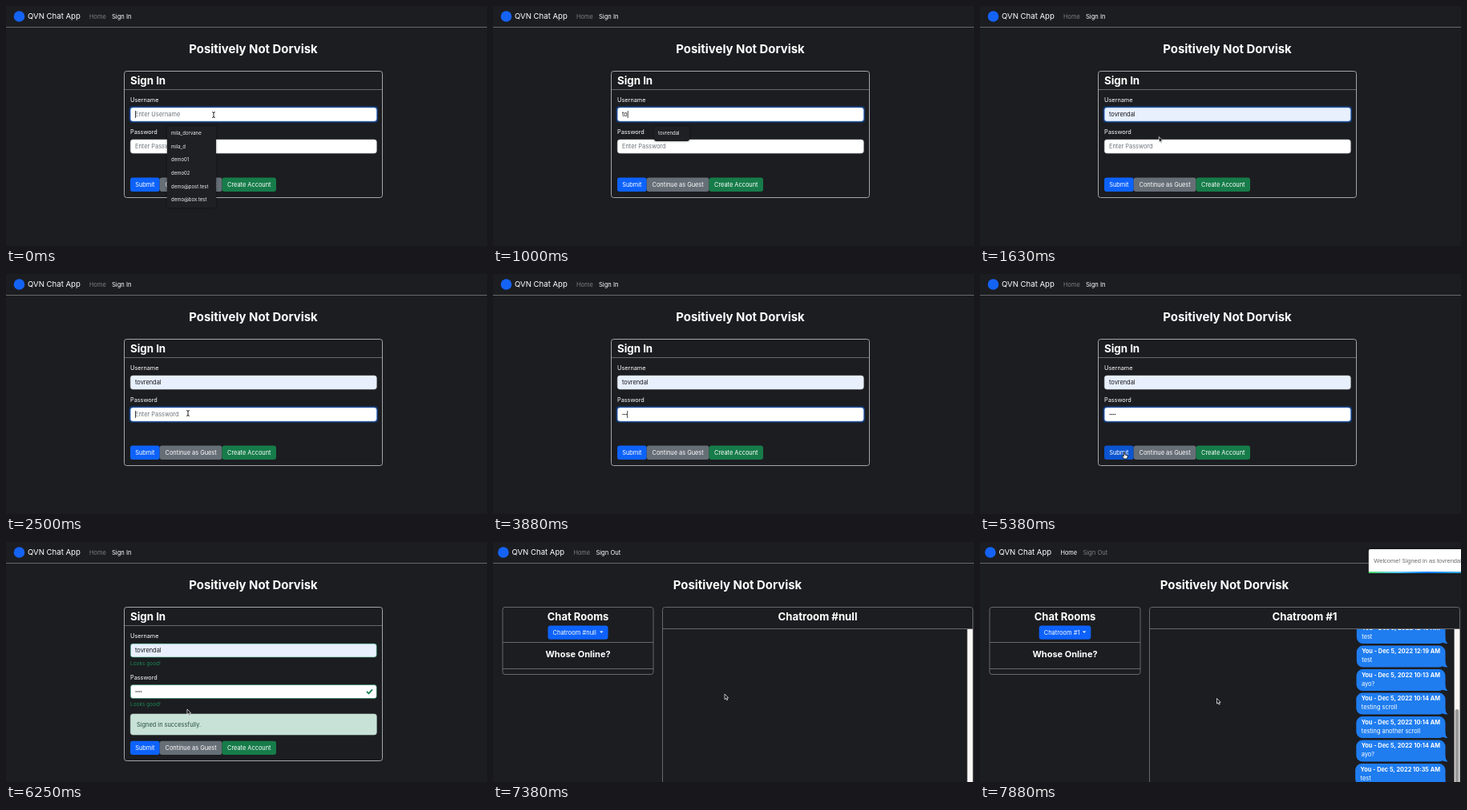
An HTML page with a canvas for the animation above (8000 ms loop, 600 by 300 pixels).

```html
<!DOCTYPE html>
<html lang="en">
<head>
<meta charset="utf-8">
<title>Chat sign in</title>
<style>
html, body { margin: 0; width: 100%; height: 100%; overflow: hidden; background: #1c1d21; }
canvas { display: block; width: 600px; height: 300px; }
</style>
</head>
<body>
<canvas id="stage" width="600" height="300"></canvas>
<script>
const ctx = document.getElementById('stage').getContext('2d');
const LOOP = 8000, STEP = 125;
const BG = '#1c1d21', WHITE = '#fff', LINE = '#67686b', BLUE = '#0d62fb', GREEN = '#167c49', GRAY = '#666e76';
const USER = 'tovrendal', APP = 'QVN Chat App', HEADLINE = 'Positively Not Dorvisk';
const SUGGESTIONS = ['mila_dorvane', 'mila_d', 'demo01', 'demo02', 'demo@post.test', 'demo@box.test'];
const MESSAGES = [
  ['12:19', 'test'], ['12:19', 'test'], ['10:13', 'ayo?'], ['10:14', 'testing scroll'],
  ['10:14', 'testing another scroll'], ['10:14', 'ayo?'], ['10:35', 'test']
];

// time, x, y of the pointer hot spot
const PATH = [
  [0, 259, 136], [1125, 259, 136], [1500, 222, 160], [2000, 227, 174], [4375, 227, 174],
  [4625, 212, 224], [4750, 189, 222], [5000, 180, 223], [5375, 180, 223], [6000, 226, 209],
  [6875, 226, 209], [7375, 289, 190], [7875, 295.5, 195.5]
];

const between = (t, a, b) => t >= a && t < b;

function text(str, x, y, size, color = WHITE, weight = 400, align = 'left', family = 'Inter') {
  ctx.font = `${weight} ${size}px ${family}, sans-serif`;
  ctx.fillStyle = color;
  ctx.textAlign = align;
  ctx.fillText(str, x, y);
}

function box(x, y, w, h, r, fill, stroke, lineWidth = 1) {
  ctx.beginPath();
  ctx.roundRect(x, y, w, h, r);
  if (fill) { ctx.fillStyle = fill; ctx.fill(); }
  if (stroke) { ctx.strokeStyle = stroke; ctx.lineWidth = lineWidth; ctx.stroke(); }
}

function rule(x1, x2, y) {
  ctx.fillStyle = LINE;
  ctx.fillRect(x1, y, x2 - x1, 1);
}

function polygon(points, x, y) {
  ctx.beginPath();
  points.forEach(([px, py]) => ctx.lineTo(x + px, y + py));
  ctx.closePath();
}

function header(shift, center, link, homeActive) {
  const dim = '#7d7e81';
  ctx.fillStyle = '#1463f5';
  ctx.beginPath();
  ctx.arc(16.5 - shift, 13, 6.8, 0, Math.PI * 2);
  ctx.fill();
  text(APP, 27 - shift, 16.3, 9.6);
  text('Home', 104 - shift, 15.6, 7.4, homeActive ? WHITE : dim);
  text(link, 132 - shift, 15.6, 7.6, homeActive ? dim : WHITE);
  rule(0, 600, 26);
  text(HEADLINE, center, 58.7, 14.9, WHITE, 700, 'center');
}

function field(y, { value = '', hint = '', fill = WHITE, focus = false, valid = false }) {
  if (focus) box(153.5, y - 1.5, 310.5, 20.5, 4, '#14386f');
  box(155.3, y + 0.3, 307, 17, 3, fill, focus ? '#6ea5f8' : valid ? '#198754' : '#ced4da', 0.6);
  if (value) text(value, 161, y + 11.3, 7.4, '#16181b');
  else if (hint) text(hint, 161, y + 11.3, 7.4, '#6c757d');
}

function caret(x, y) {
  ctx.fillStyle = '#222';
  ctx.fillRect(x, y, 0.8, 9);
}

function button(label, x, y, w, color) {
  box(x, y, w, 17.3, 3, color);
  text(label, x + w / 2, y + 11.3, 7.4, WHITE, 400, 'center');
}

function suggestions(t) {
  const all = t < 500;
  const items = all ? SUGGESTIONS : [USER];
  ctx.shadowColor = 'rgba(0,0,0,.5)';
  ctx.shadowBlur = 3;
  box(201, 150, all ? 61 : 44, all ? 102 : 19, 3, '#1f2023');
  ctx.shadowBlur = 0;
  if (between(t, 1375, 1625)) box(201, 153, 44, 14, 0, '#3a3b3f');
  items.forEach((item, i) => text(item, 206, 161.2 + i * 16.6, 6, '#f0f0f0'));
}

function signIn(t) {
  const done = t >= 5500, filled = t >= 1375;
  const typed = filled ? USER : USER.slice(0, t < 500 ? 0 : t < 750 ? 1 : 2);
  const dots = [3375, 3625, 3875, 4000].filter(at => t >= at).length;
  const passY = done ? 178.3 : 166.8, buttonY = done ? 248.8 : 214.6;

  header(0, 308.5, 'Sign In', false);
  box(147.5, 81.5, 322, done ? 192 : 158, 3, null, '#a5a6a8');
  rule(148, 469, 104);
  text('Sign In', 155, 97.7, 13.3, WHITE, 700);

  text('Username', 155, 120.2, 7.3);
  field(126.8, {
    value: typed, hint: 'Enter Username', fill: filled ? '#e8f0fe' : WHITE,
    focus: t < 2250, valid: done
  });
  if (t < 250 || between(t, 500, 1375)) {
    ctx.font = '400 7.4px Inter, sans-serif';
    caret(161 + ctx.measureText(typed).width, 131);
  }

  text('Password', 155, passY - 6.8, 7.3);
  field(passY, {
    hint: dots ? '' : 'Enter Password', focus: between(t, 2250, 5500), valid: done
  });
  ctx.fillStyle = '#222';
  for (let i = 0; i < dots; i++) {
    ctx.beginPath();
    ctx.arc(162.2 + i * 2.1, passY + 8.7, 0.75, 0, Math.PI * 2);
    ctx.fill();
  }
  if (between(t, 2250, 2750) || between(t, 3375, 4375)) caret(161 + dots * 2.1, passY + 4.2);

  if (done) {
    text('Looks good!', 155, 153.6, 6.5, '#198754');
    text('Looks good!', 155, 204.9, 6.5, '#198754');
    ctx.strokeStyle = '#198754';
    ctx.lineWidth = 1.9;
    ctx.beginPath();
    ctx.moveTo(450, 187);
    ctx.lineTo(452.5, 189.4);
    ctx.lineTo(457, 184.3);
    ctx.stroke();
    box(155.3, 215, 307, 26, 3, '#c9e2d7', '#badbcc', 0.6);
    text('Signed in successfully.', 163, 230.6, 7.4, '#25503d');
  }

  button('Submit', 155, buttonY, 36.7, between(t, 4875, 5500) ? '#0b55d0' : BLUE);
  button('Continue as Guest', 191.7, buttonY, 77.8, between(t, 4625, 4875) ? '#555c63' : GRAY);
  button('Create Account', 269.5, buttonY, 67.5, GREEN);
  if (t < 1625) suggestions(t);
}

function bubble([time, body], baseline) {
  const title = `You - Dec 5, 2022 ${time} AM`;
  ctx.font = '700 7.35px Inter, sans-serif';
  const left = 574 - ctx.measureText(title).width;
  const right = 580.5, top = baseline - 9.8, bottom = top + 27;
  box(left - 6.5, top, right - left + 6.5, 27, 8, '#1f7df0');
  ctx.beginPath();
  ctx.moveTo(right, bottom - 8);
  ctx.quadraticCurveTo(right, bottom - 2, right + 3, bottom - 0.3);
  ctx.quadraticCurveTo(right - 2.5, bottom + 0.3, right - 6.5, bottom - 3);
  ctx.fill();
  text(title, left, baseline, 7.35, WHITE, 700);
  text(body, left, baseline + 11, 7.4);
}

function toast(t) {
  const p = Math.min((t - 7612) / 420, 1);
  const x = 409 + 0.57 * (3025 * (1 - p) ** 3 - 25);
  if (x > 600) return;
  ctx.shadowColor = 'rgba(0,0,0,.3)';
  ctx.shadowBlur = 4;
  box(x, 9, 182, 30, 2, WHITE);
  ctx.shadowBlur = 0;
  text(`Welcome! Signed in as ${USER}`, x + 6.5, 26.4, 7.5, '#6a6a6a', 400, 'left', '"Liberation Sans"');
  const bar = ctx.createLinearGradient(x, 0, x + 182, 0);
  ['#4cd964', '#5ac8fa', '#007aff', '#34aadc', '#5856d6', '#ff2d55']
    .forEach((color, i) => bar.addColorStop(i / 5, color));
  ctx.fillStyle = bar;
  ctx.fillRect(x, 37, 182, 2);
}

function chat(t) {
  const joined = t >= 7625;
  const room = joined ? 'Chatroom #1' : 'Chatroom #null';
  header(3.6, 305, 'Sign Out', joined);

  box(12, 81.5, 188, 84, 3, null, LINE);
  text('Chat Rooms', 106, 97.7, 13, WHITE, 700, 'center');
  const half = joined ? 32.3 : 37.5;
  box(106 - half, 104.5, half * 2, 17.3, 3, BLUE);
  text(room, 112 - half, 115.7, 7.5);
  ctx.fillStyle = WHITE;
  polygon([[-10.5, 0], [-6, 0], [-8.25, 2.3]], 106 + half, 111.4);
  ctx.fill();
  rule(12, 200, 125);
  text('Whose Online?', 106, 144, 11, WHITE, 700, 'center');
  rule(12, 200, 158);

  box(211.5, 81.5, 387, 240, 3, null, LINE);
  text(room, 405, 97.7, 13.2, WHITE, 700, 'center');
  rule(212, 598, 108);
  ctx.fillStyle = '#fcf7f4';
  ctx.fillRect(591.6, 109, 6.8, 191);
  if (joined) {
    box(592.7, 209, 4.6, 110, 2.3, '#9c9b9a');
    ctx.save();
    ctx.beginPath();
    ctx.rect(212, 109, 379, 191);
    ctx.clip();
    MESSAGES.forEach((message, i) => bubble(message, 109.9 + i * 29.5));
    ctx.restore();
    toast(t);
  }
}

function pointer(t) {
  if (between(t, 500, 1125) || between(t, 3375, 4375)) return;
  let i = PATH.findIndex(key => key[0] > t);
  if (i < 0) i = PATH.length - 1;
  const [t0, x0, y0] = PATH[i - 1], [t1, x1, y1] = PATH[i];
  const k = Math.min((t - t0) / (t1 - t0), 1);
  const x = x0 + (x1 - x0) * k, y = y0 + (y1 - y0) * k;
  ctx.lineJoin = 'round';

  if (t < 1250 || between(t, 1875, 4500)) {
    ctx.strokeStyle = '#111';
    ctx.lineWidth = 0.9;
    ctx.beginPath();
    ctx.moveTo(x - 1.8, y - 3.5);
    ctx.quadraticCurveTo(x, y - 3.5, x, y - 2);
    ctx.lineTo(x, y + 2);
    ctx.quadraticCurveTo(x, y + 3.5, x - 1.8, y + 3.5);
    ctx.moveTo(x + 1.8, y - 3.5);
    ctx.quadraticCurveTo(x, y - 3.5, x, y - 2);
    ctx.moveTo(x, y + 2);
    ctx.quadraticCurveTo(x, y + 3.5, x + 1.8, y + 3.5);
    ctx.stroke();
    return;
  }
  const hand = between(t, 4625, 5500);
  const shape = hand
    ? [[-0.7, 0], [0.6, 0], [0.8, 3], [4, 3.8], [4.2, 5.5], [3.2, 8], [-0.4, 8], [-2.6, 4.8], [-1.8, 4.2], [-0.7, 5]]
    : [[0, 0], [0, 6.6], [1.5, 5.3], [2.6, 7.7], [3.7, 7.2], [2.6, 4.9], [4.6, 4.8]];
  polygon(shape, x, y);
  ctx.fillStyle = hand ? WHITE : '#050505';
  ctx.strokeStyle = hand ? '#111' : '#eee';
  ctx.lineWidth = 0.8;
  ctx.fill();
  ctx.stroke();
}

function draw(now) {
  const t = Math.floor((now % LOOP) / STEP) * STEP;
  ctx.fillStyle = BG;
  ctx.fillRect(0, 0, 600, 300);
  if (t < 6875) signIn(t);
  else chat(t);
  pointer(t);
}

let start;
function tick(now) {
  start ??= now;
  draw(Math.max(0, now - start));
  requestAnimationFrame(tick);
}
draw(0);
requestAnimationFrame(tick);
</script>
</body>
</html>
```
